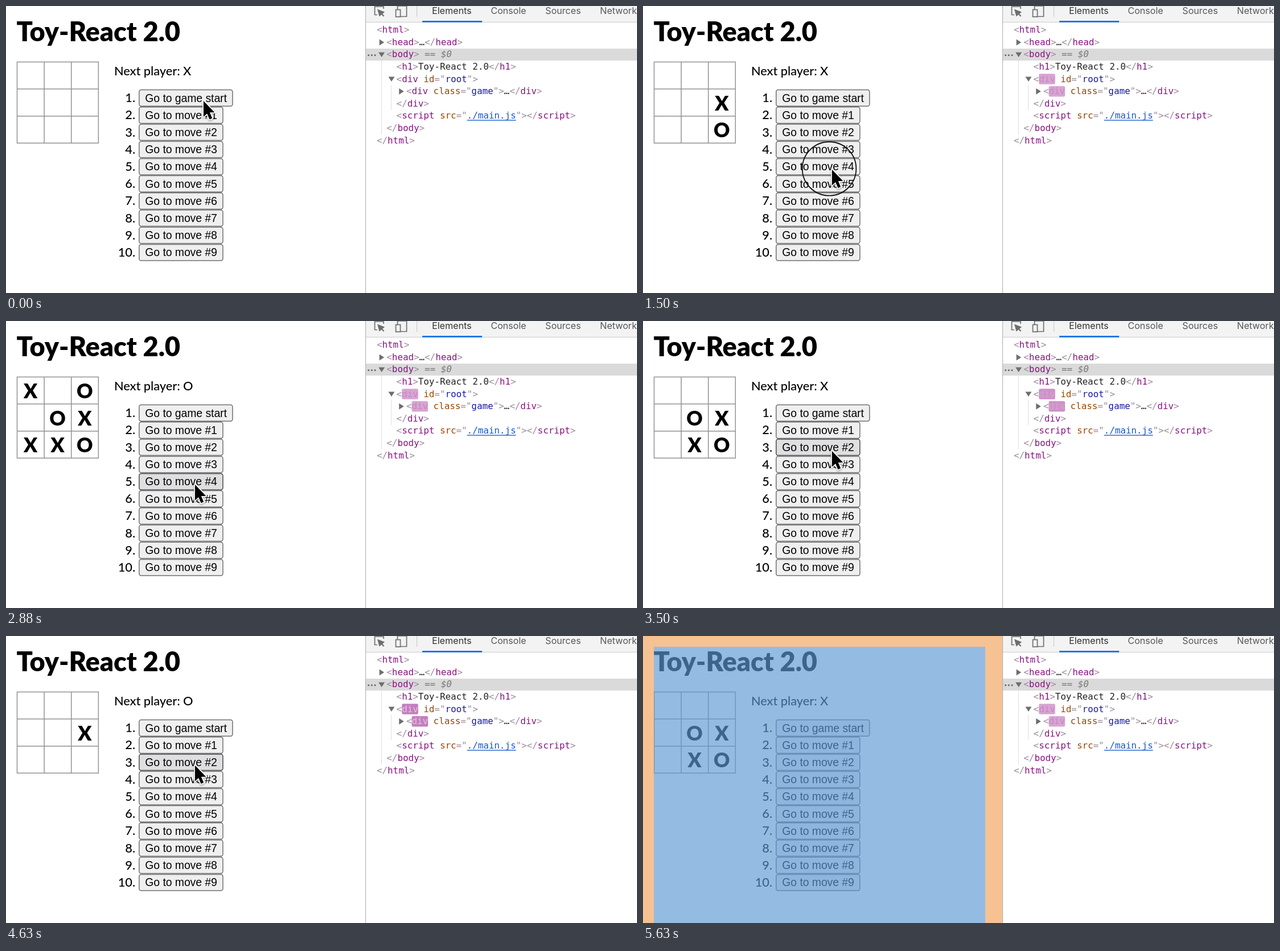
An HTML page with a canvas for the animation above (5760 ms loop, 1108 by 505 pixels).

```html
<!DOCTYPE html>
<html lang="en">
<head>
<meta charset="utf-8">
<title>Time travel demo</title>
<style>
  html, body { margin: 0; width: 100%; height: 100%; overflow: hidden; background: #fff; }
  canvas { display: block; width: 1108px; height: 505px; }
</style>
</head>
<body>
<canvas id="stage" width="1108" height="505"></canvas>
<script>
const ctx = document.getElementById('stage').getContext('2d');
const LOOP = 5760, INSPECT_AT = 5630, STEP = 125, LAG = 125;
const PAGE = 'Lato, "Open Sans", sans-serif';
const BUTTON = '19.3px "Liberation Sans", Arial, sans-serif';
const MONO = '15.85px "DejaVu Sans Mono", monospace';
const TABS = '16.1px Inter, Roboto, sans-serif';
const TAG = '#881280', PUNCT = '#9c8a9a', ATTR = '#994500', VALUE = '#1a1aa6', LINK = '#1155cc';
const ICON = '#6e6e6e', DARK = '#222';
const CELL = 47.6, BUTTON_PITCH = 30.2, ROW_PITCH = 21.58, INDENT = 17.3;

const game = [5, 8, 7, 4, 0, 2, 6, 3, 1];
const clicks = [[250, 0], [880, 2], [1500, 4], [2250, 7], [3000, 4],
                [3750, 2], [4250, 1], [4750, 2], [5000, 4]]
  .map(([time, step]) => ({ time, step, x: step ? 331 : 346, y: 165.5 + step * BUTTON_PITCH }));
const exit = { time: 5700, x: 918, y: 100 };

const mix = (a, b, p) => a + (b - a) * p;
const mixColor = (a, b, p) => `rgb(${a.map((v, i) => Math.round(mix(v, b[i], p)))})`;
const clamp = x => Math.min(1, Math.max(0, x));
const smooth = x => x * x * (3 - 2 * x);

function captureTime(now) {
  const start = i => Math.round(i * STEP / 10) * 10;
  const i = Math.min(45, Math.floor(now / STEP));
  return start(i) > now ? start(i - 1) : start(i);
}

// The pointer rests after a click, moves on, and rests before the next one.
function pointerAt(t) {
  const next = clicks.findIndex(c => c.time > t);
  const to = next < 0 ? exit : clicks[next];
  const from = next < 0 ? clicks[clicks.length - 1] : clicks[Math.max(0, next - 1)];
  const p = smooth(clamp(((t - from.time) / (to.time - from.time || 1) - .32) / .38));
  return { x: mix(from.x, to.x, p), y: mix(from.y, to.y, p) };
}

function text(str, x, y, font, color = '#000', align = 'left') {
  ctx.font = font;
  ctx.fillStyle = color;
  ctx.textAlign = align;
  ctx.fillText(str, x, y);
}

const pageText = (str, x, y, align) => text(str, x, y, `500 21.7px ${PAGE}`, '#000', align);

function line(color, width, ...points) {
  ctx.strokeStyle = color;
  ctx.lineWidth = width;
  ctx.beginPath();
  points.forEach(([x, y]) => ctx.lineTo(x, y));
  ctx.stroke();
}

function polygon(color, points) {
  ctx.fillStyle = color;
  ctx.beginPath();
  points.forEach(([x, y]) => ctx.lineTo(x, y));
  ctx.fill();
}

function rect(color, x, y, w, h) {
  ctx.fillStyle = color;
  ctx.fillRect(x, y, w, h);
}

function roundBox(color, x, y, w, h, r) {
  ctx.fillStyle = color;
  ctx.beginPath();
  ctx.roundRect(x, y, w, h, r);
  ctx.fill();
}

function drawBoard(step) {
  for (let i = 0; i < 4; i++) {
    const d = i * CELL, end = 3 * CELL;
    line('#929292', 1.5, [19.5 + d, 98], [19.5 + d, 99 + end]);
    line('#929292', 1.5, [19, 98.5 + d], [20 + end, 98.5 + d]);
  }
  game.slice(0, step).forEach((cell, i) => {
    const x = 43 + cell % 3 * CELL, y = 136 + Math.floor(cell / 3) * CELL;
    text(i % 2 ? 'O' : 'X', x, y, `900 35px ${PAGE}`, '#000', 'center');
  });
}

function drawList(pointer, pressed) {
  for (let i = 0; i < 10; i++) {
    const y = 147.6 + i * BUTTON_PITCH, w = i ? 147 : 164;
    const hovered = !pressed && pointer.x < 234 + w && Math.abs(pointer.y - y - 14.3) < 15;
    pageText(`${i + 1}.`, 227, y + 21.6, 'right');
    roundBox(hovered ? '#dfdfe1' : '#efeff0', 233.8, y, w, 28.6, 3.5);
    ctx.strokeStyle = hovered ? '#484848' : '#707070';
    ctx.lineWidth = 1.5;
    ctx.stroke();
    text(i ? `Go to move #${i}` : 'Go to game start', 244.3, y + 20.9, BUTTON);
  }
}

function drawPage(step, pointer, pressed) {
  text('Toy-React 2.0', 18.5, 62, `900 46.8px ${PAGE}`);
  drawBoard(step);
  pageText(`Next player: ${step % 2 ? 'O' : 'X'}`, 190, 121.5);
  drawList(pointer, pressed);
}

function drawOverlay() {
  const margin = 19, width = 631, height = 505, edge = '#f7c292';
  rect('rgba(93,152,212,.66)', margin, margin, 582, height - margin);
  rect(edge, 0, 0, width, margin);
  rect(edge, 0, margin, margin, height);
  rect(edge, 601, margin, width - 601, height);
}

function drawToolbar() {
  rect('#f3f3f3', 631, 0, 477, 28);
  line('#cccccc', 1, [631, 28.5], [1108, 28.5]);
  line('#cccccc', 1.2, [721.5, 0], [721.5, 19]);
  line(ICON, 1.7, [652, 15.5], [647.5, 15.5], [647.5, 1], [663, 1], [663, 5]);
  polygon(ICON, [[652, 5.5], [665, 10.5], [655.5, 18.5]]);
  line(ICON, 2.2, [658, 12], [663.5, 18]);
  line(ICON, 1.7, [687.5, 6], [687.5, 0], [703.5, 0], [703.5, 18.5], [693, 18.5]);
  ctx.strokeRect(684.5, 6.5, 8, 12.5);
  let x = 748;
  for (const label of ['Elements', 'Console', 'Sources', 'Network']) {
    text(label, x, 14.3, TABS, x === 748 ? '#333' : '#55585c');
    x += ctx.measureText(label).width + 33.6;
  }
  rect('#1a73e8', 731, 26, 105, 2.8);
}

const open = (name, ...attrs) => [['<', PUNCT], [name, TAG], ...attrs, ['>', PUNCT]];
const close = name => [['</', PUNCT], [name, TAG], ['>', PUNCT]];
const attr = (name, value, color = VALUE) =>
  [[' ' + name, ATTR], ['="', PUNCT], [value, color], ['"', PUNCT]];

const tree = [
  { depth: 0, code: open('html') },
  { depth: 1, code: [...open('head'), ['…', DARK], ...close('head')], arrow: 'right' },
  { depth: 1, code: [...open('body'), [' == $0', '#777', 'italic']], arrow: 'down' },
  { depth: 2, code: [...open('h1'), ['Toy-React 2.0', DARK], ...close('h1')] },
  { depth: 2, code: open('div', ...attr('id', 'root')), arrow: 'down', live: true },
  { depth: 3, code: [...open('div', ...attr('class', 'game')), ['…', DARK], ...close('div')], arrow: 'right', live: true },
  { depth: 2, code: close('div') },
  { depth: 2, code: [...open('script', ...attr('src', './main.js', LINK)), ...close('script')] },
  { depth: 1, code: close('body') },
  { depth: 0, code: close('html') }
];

function drawArrow(x, y, direction) {
  ctx.save();
  ctx.translate(x, y);
  if (direction === 'down') ctx.rotate(Math.PI / 2);
  polygon(ICON, [[-4, -5.5], [4.5, 0], [-4, 5.5]]);
  ctx.restore();
}

function drawNode({ depth, code, arrow, live }, row, fade) {
  const y = 42.3 + row * ROW_PITCH;
  let x = 651 + depth * INDENT;
  if (arrow) drawArrow(x - 8.7, y, arrow);
  code.forEach(([str, color, style = ''], i) => {
    ctx.font = `${style} ${MONO}`;
    const w = ctx.measureText(str).width;
    if (live && i === 1 && fade < 1) {
      roundBox(mixColor([178, 85, 170], [254, 244, 252], fade), x, y - 9.3, w, 18.5, 2.5);
      color = mixColor([255, 255, 255], [136, 18, 128], fade);
    }
    text(str, x, y + 5, ctx.font, color);
    if (color === LINK) rect(LINK, x, y + 7, w, 1.3);
    x += w;
  });
}

function drawTree(fade) {
  rect('#dadada', 632, 75, 476, 21);
  line('#dddddd', 1, [659.5, 96], [659.5, 226]);
  line('#dddddd', 1, [676.5, 139], [676.5, 183]);
  for (let i = 0; i < 3; i++) roundBox(ICON, 635 + i * 5.7, 85, 3.2, 3.2, 1.6);
  tree.forEach((node, row) => drawNode(node, row, fade));
}

function drawPointer({ x, y }, pressed) {
  if (pressed) {
    ctx.strokeStyle = '#111';
    ctx.lineWidth = 1.8;
    ctx.beginPath();
    ctx.arc(x - 4, y, 47.3, 0, 7);
    ctx.stroke();
  }
  ctx.save();
  ctx.translate(x + .8, y + 1.5);
  const shape = [[0, 0], [0, 28], [6.3, 22.3], [10.6, 32.5], [15.3, 30.5], [11, 20.3], [19.5, 20.3]];
  ctx.lineJoin = 'round';
  ctx.shadowColor = 'rgba(0,0,0,.35)';
  ctx.shadowBlur = 3;
  ctx.shadowOffsetY = 1.5;
  line('#fff', 3.4, ...shape, shape[0]);
  ctx.shadowColor = 'transparent';
  polygon('#000', shape);
  ctx.restore();
}

function draw(now) {
  const t = captureTime(now);
  const pointer = pointerAt(t);
  const pressed = clicks.some(c => t >= c.time && t < c.time + LAG);
  const shown = clicks.filter(c => c.time + LAG <= t).pop();
  const fade = shown ? (t - shown.time - LAG) / 1000 : 1;
  const inspecting = t >= INSPECT_AT;

  rect('#fff', 0, 0, 1108, 505);
  drawPage(shown ? shown.step : 0, pointer, pressed || t === 0);
  if (inspecting) drawOverlay();
  drawToolbar();
  drawTree(fade);
  line('#b5b5b5', 1.2, [631.5, 0], [631.5, 505]);
  if (!inspecting) drawPointer(pointer, pressed);
}

const began = performance.now();
function tick() {
  draw((performance.now() - began) % LOOP);
  requestAnimationFrame(tick);
}
tick();
</script>
</body>
</html>
```
